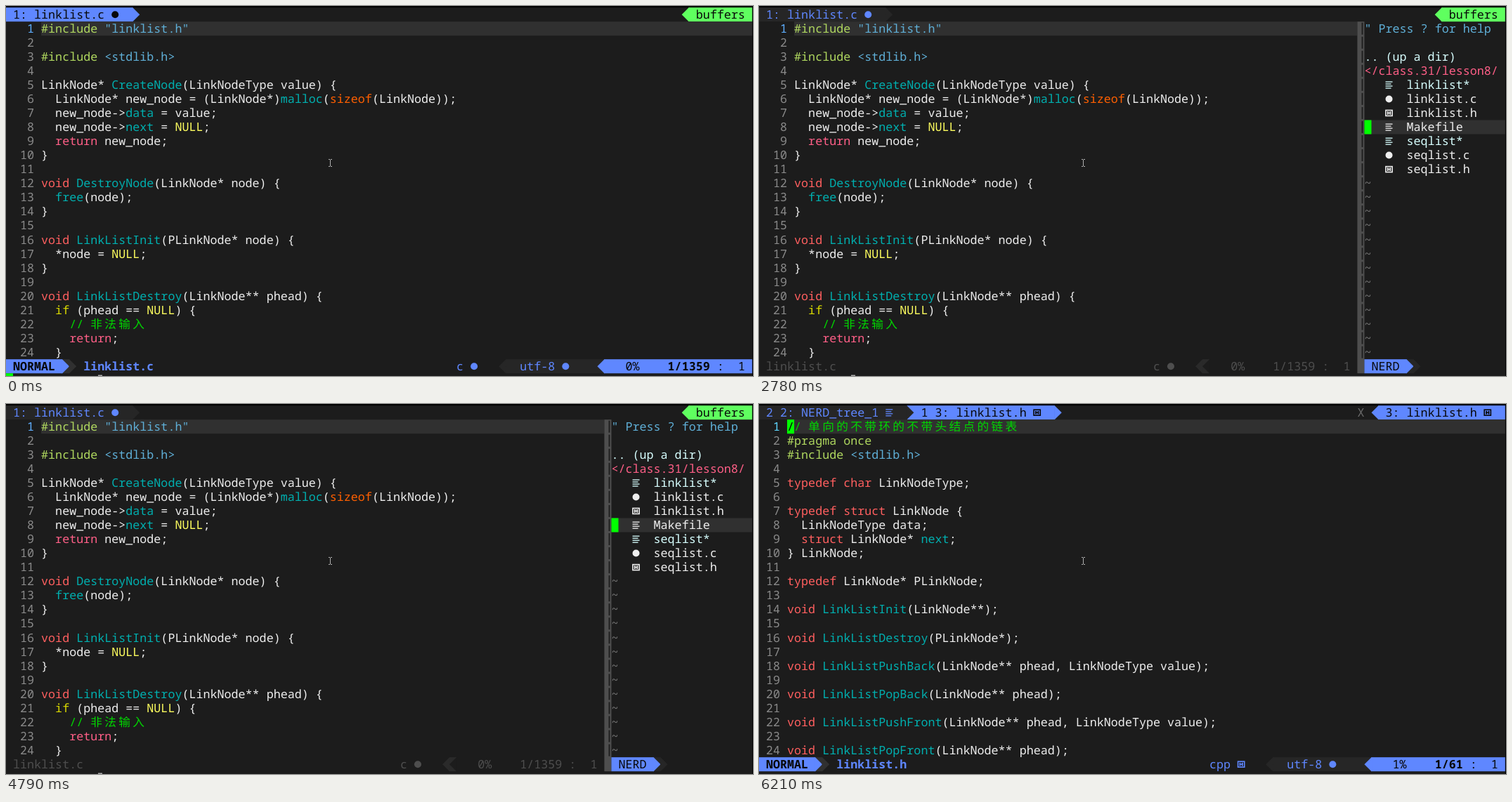
Animation, 1063 px wide and 527 px high, one loop 8930 ms. Source, as an HTML page with a canvas:

```html
<!DOCTYPE html>
<html lang="en">
<head>
<meta charset="utf-8">
<title>Editor session</title>
<style>
html, body { margin: 0; width: 100%; height: 100%; overflow: hidden; background: #1c1c1c; }
canvas { display: block; }
</style>
</head>
<body>
<canvas id="stage" width="1063" height="527"></canvas>
<script>
const ctx = document.getElementById('stage').getContext('2d');
ctx.textRendering = 'geometricPrecision';
const LOOP = 8930, CW = 10.017, RH = 20.04, TOP = 2.16, COLS = 106;
const MONO = '16.7px "Noto Sans Mono", "Noto Sans CJK SC", "Noto Sans CJK", monospace';
const C = {
  bg: '#1c1c1c', line: '#303030', seg: '#262626', ink: '#eeeeee', num: '#8a8a8a',
  dim: '#4e4e4e', blue: '#5f87ff', lime: '#5fff5f', cursor: '#00ff00', dark: '#080808',
  exec: '#d7ffff', note: '#00d700', pre: '#afd75f', str: '#5fafd7', func: '#00afaf',
  size: '#ff5f00', lit: '#ffff5f', cond: '#d7d700', ret: '#ff5f87', type: '#ff5f5f'
};

const SOURCE = `#include "linklist.h"

#include <stdlib.h>

LinkNode* CreateNode(LinkNodeType value) {
  LinkNode* new_node = (LinkNode*)malloc(sizeof(LinkNode));
  new_node->data = value;
  new_node->next = NULL;
  return new_node;
}

void DestroyNode(LinkNode* node) {
  free(node);
}

void LinkListInit(PLinkNode* node) {
  *node = NULL;
}

void LinkListDestroy(LinkNode** phead) {
  if (phead == NULL) {
    // 非法输入
    return;
  }`.split('\n');

const HEADER = `// 单向的不带环的不带头结点的链表
#pragma once
#include <stdlib.h>

typedef char LinkNodeType;

typedef struct LinkNode {
  LinkNodeType data;
  struct LinkNode* next;
} LinkNode;

typedef LinkNode* PLinkNode;

void LinkListInit(LinkNode**);

void LinkListDestroy(PLinkNode*);

void LinkListPushBack(LinkNode** phead, LinkNodeType value);

void LinkListPopBack(LinkNode** phead);

void LinkListPushFront(LinkNode** phead, LinkNodeType value);

void LinkListPopFront(LinkNode** phead);`.split('\n');

const FILES = [
  ['lines', 'linklist*'], ['dot', 'linklist.c'], ['box', 'linklist.h'], ['lines', 'Makefile'],
  ['lines', 'seqlist*'], ['dot', 'seqlist.c'], ['box', 'seqlist.h']
];

// Group names match the colour keys
const TOKEN = new RegExp([
  '(?<note>//.*)', '(?<pre>#pragma once|#include)', '(?<str>"[^"]*"|<[^>]*>)',
  '(?<size>sizeof)', '(?<lit>NULL)', '(?<cond>\\bif\\b)', '(?<ret>return)',
  '(?<type>\\b(?:void|typedef|char|struct)\\b)',
  '(?<func>\\b\\w+(?=\\()|(?<=->)\\w+|\\bnext\\b)'
].join('|'), 'g');

const rowY = r => TOP + r * RH;

function cells(col, row, n, color) {
  ctx.fillStyle = color;
  ctx.fillRect(col * CW, rowY(row), n * CW, RH);
}

// Wide characters take two cells; returns the next free column
function text(str, col, row, color, bold) {
  ctx.font = (bold ? 'bold ' : '') + MONO;
  ctx.fillStyle = color;
  for (const ch of str) {
    ctx.fillText(ch, col * CW, rowY(row) + 15.7);
    col += ch > '\u2e80' ? 2 : 1;
  }
  return col;
}

// The base overlaps its segment slightly to hide the seam
function arrow(col, row, dir, color) {
  const x = (dir > 0 ? col : col + 1) * CW, base = x - dir * 0.6, y = rowY(row);
  ctx.fillStyle = color;
  ctx.beginPath();
  ctx.moveTo(base, y);
  ctx.lineTo(x, y);
  ctx.lineTo(x + dir * CW, y + RH / 2);
  ctx.lineTo(x, y + RH);
  ctx.lineTo(base, y + RH);
  ctx.fill();
}

function icon(kind, col, row, color) {
  const x = (col + 0.5) * CW, y = rowY(row) + RH / 2;
  ctx.fillStyle = ctx.strokeStyle = color;
  if (kind === 'dot') {
    ctx.beginPath();
    ctx.arc(x, y, 5, 0, Math.PI * 2);
    ctx.fill();
  } else if (kind === 'box') {
    ctx.lineWidth = 1.6;
    ctx.strokeRect(x - 4.6, y - 4, 9.2, 8);
    ctx.fillRect(x - 2.6, y - 2.4, 1.8, 4.8);
    ctx.fillRect(x + 0.8, y - 2.4, 1.8, 4.8);
    ctx.fillRect(x - 1, y - 0.8, 2, 1.6);
  } else {
    for (let i = 0; i < 4; i++) ctx.fillRect(x - 5, y - 5 + i * 3, i % 2 ? 8 : 10, 1.3);
  }
}

function code(lines, gutter, width, numColor) {
  cells(gutter, 1, width - gutter, C.line);
  lines.forEach((line, i) => {
    const row = i + 1, num = String(row);
    text(num, gutter - 1 - num.length, row, i ? C.num : numColor);
    let col = gutter, last = 0;
    for (const m of line.matchAll(TOKEN)) {
      const key = Object.keys(m.groups).find(k => m.groups[k]);
      col = text(line.slice(last, m.index), col, row, C.ink);
      col = text(m[0], col, row, C[key]);
      last = m.index + m[0].length;
    }
    text(line.slice(last), col, row, C.ink);
  });
}

function sourceTabs(active) {
  const ink = active ? C.dark : C.blue, fill = active ? C.blue : C.seg;
  cells(0, 0, 18, fill);
  arrow(18, 0, 1, fill);
  text('1: linklist.c', 1, 0, ink);
  icon('dot', 15, 0, ink);
  cells(97, 0, 9, C.lime);
  arrow(96, 0, -1, C.lime);
  text('buffers', 98, 0, C.dark);
}

function headerTabs() {
  cells(0, 0, 21, C.seg);
  text('2 2: NERD_tree_1', 1, 0, C.blue);
  icon('lines', 18, 0, C.blue);
  cells(21, 0, 21, C.blue);
  arrow(21, 0, 1, C.seg);
  arrow(42, 0, 1, C.blue);
  text('1 3: linklist.h', 23, 0, C.dark);
  icon('box', 39, 0, C.dark);
  text('X', 85, 0, '#6c6c6c');
  cells(88, 0, 18, C.blue);
  arrow(87, 0, -1, C.blue);
  text('3: linklist.h', 89, 0, C.dark);
  icon('box', 103, 0, C.dark);
}

function status(file, type, kind, enc, percent, pos) {
  const end = 100 - pos.length - 10;
  cells(0, 25, 8, C.blue);
  cells(8, 25, 1, C.line);
  arrow(8, 25, 1, C.blue);
  arrow(9, 25, 1, C.line);
  text('NORMAL', 1, 25, C.dark, true);
  text(file, 11, 25, C.blue, true);
  text(type, 64, 25, C.blue);
  icon(kind, 65 + type.length, 25, C.blue);
  cells(enc - 2, 25, end + 3 - enc, C.seg);
  arrow(enc - 3, 25, -1, C.seg);
  text('utf-8', enc, 25, C.blue);
  icon('dot', enc + 6, 25, C.blue);
  cells(end + 1, 25, COLS - end - 1, C.blue);
  arrow(end, 25, -1, C.blue);
  text(percent, end + 4, 25, C.dark);
  text(pos, 100 - pos.length, 25, C.dark, true);
  text(':  1', 101, 25, C.dark);
}

function idleStatus() {
  text('linklist.c', 1, 25, C.dim);
  text('c', 56, 25, C.dim);
  icon('dot', 58, 25, C.dim);
  cells(63, 25, 1, '#2a2a2a');
  arrow(62, 25, -1, '#2a2a2a');
  arrow(63, 25, -1, C.bg);
  text('0%', 67, 25, C.dim);
  text('1/1359 :  1', 73, 25, C.dim);
}

function divider() {
  ctx.fillStyle = C.dim;
  ctx.fillRect(85 * CW, rowY(1), CW, 25 * RH);
  ctx.fillStyle = C.bg;
  for (let r = 1; r < 25; r++) ctx.fillRect(857.6, rowY(r) + 1.5, 1.8, 17);
}

function tree(sel, focus) {
  divider();
  cells(86, sel, 20, C.line);
  if (focus) cells(86, sel, 1, C.cursor);
  text('" Press ? for help', 86, 1, C.str);
  text('.. (up a dir)', 86, 3, C.exec);
  text('</class.31/lesson8/', 86, 4, C.ret);
  if (focus && sel === 4) text('<', 86, 4, C.dark);
  FILES.forEach(([kind, name], i) => {
    const color = name.endsWith('*') ? C.exec : C.ink;
    icon(kind, 89, i + 5, color);
    text(name, 92, i + 5, color);
  });
  for (let r = 12; r < 25; r++) text('~', 86, r, '#767676');
  cells(86, 25, 6, C.blue);
  cells(92, 25, 1, C.seg);
  arrow(92, 25, 1, C.blue);
  arrow(93, 25, 1, C.seg);
  text('NERD', 87, 25, C.dark);
}

function pointer() {
  ctx.fillStyle = '#b0b0b0';
  ctx.fillRect(461, 219, 1, 9);
  for (const y of [218, 228]) {
    ctx.fillRect(459, y, 2, 1);
    ctx.fillRect(462, y, 2, 1);
  }
}

function messageTip() {
  ctx.fillStyle = '#a8a8a8';
  ctx.fillRect(131, 525.5, 6, 1.5);
}

// [start time, selected row]
const MOVES = [
  [70, 4], [2230, 5], [2460, 6], [2610, 7], [2780, 8], [3010, 9], [3160, 10],
  [4550, 9], [4790, 8], [4960, 7], [5100, 6], [5430, 7]
];

function draw(t) {
  ctx.fillStyle = C.bg;
  ctx.fillRect(0, 0, 1063, 527);
  ctx.fillStyle = '#000';
  ctx.fillRect(0, 0, 1063, TOP);
  ctx.fillRect(1062, 0, 1, 527);
  if (t >= 6120) {
    headerTabs();
    code(HEADER, 4, COLS, '#5fd7ff');
    cells(4, 1, 1, C.cursor);
    text('/', 4, 1, C.dark);
    status('linklist.h', 'cpp', 'box', 75, '1%', '1/61');
  } else if (t < 70) {
    sourceTabs(true);
    code(SOURCE, 5, COLS, '#5fafff');
    status('linklist.c', 'c', 'dot', 73, '0%', '1/1359');
    cells(0, 26, 1, C.cursor);
    messageTip();
  } else {
    sourceTabs(false);
    code(SOURCE, 5, 85, '#5fafff');
    idleStatus();
    const focus = t < 5980;
    tree(MOVES.findLast(m => t >= m[0])[1], focus);
    if (!focus) cells(1, 26, 1, C.cursor);
    messageTip();
    if (t >= 4550 && t < 4640) {
      ctx.font = 'bold 19.5px "Open Sans", "Noto Sans", sans-serif';
      ctx.fillStyle = '#fff';
      ctx.fillText('Text', 511, 519);
    }
  }
  pointer();
}

const start = performance.now();
function tick() {
  draw((performance.now() - start) % LOOP);
  requestAnimationFrame(tick);
}
tick();
</script>
</body>
</html>
```
